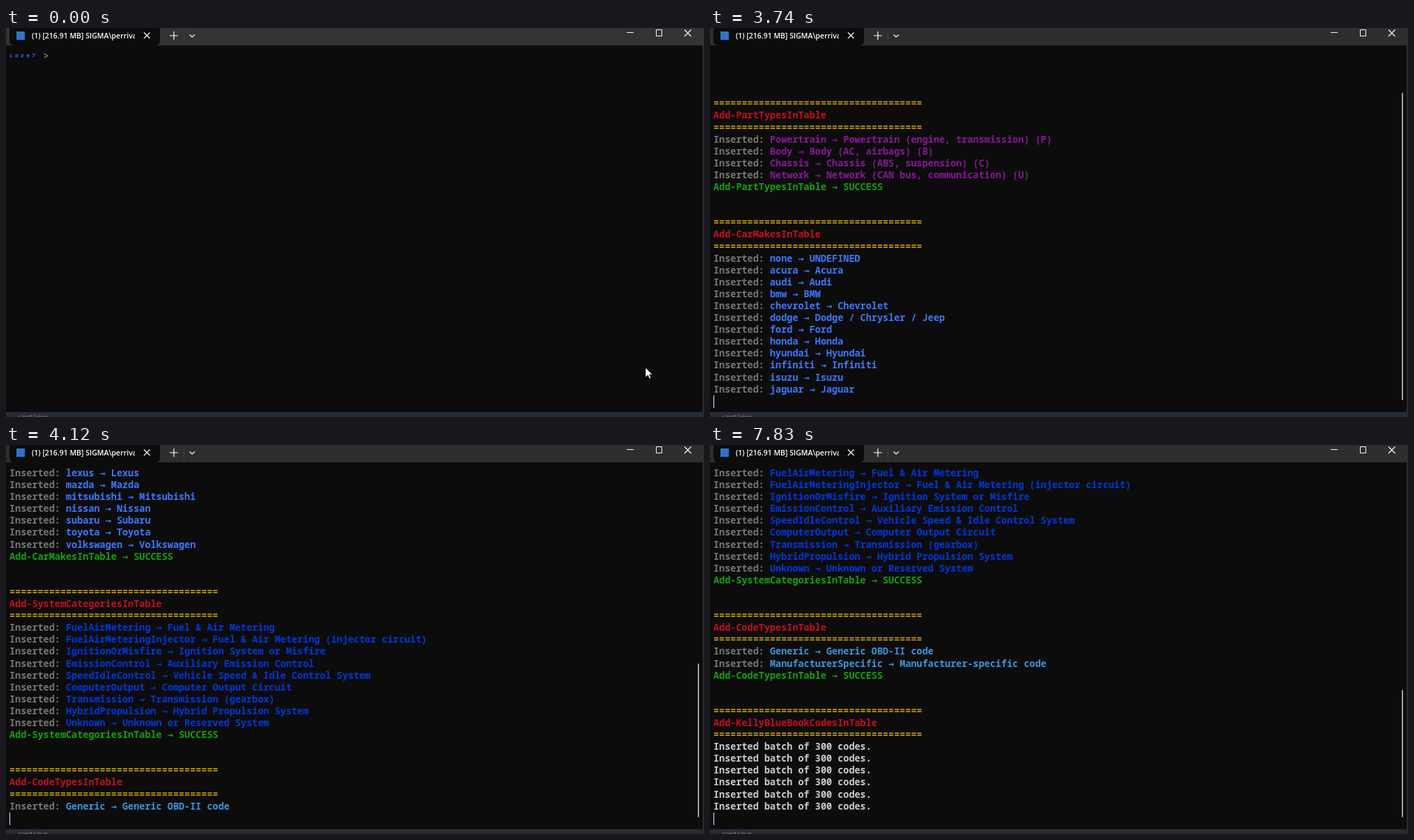
Animation of 1002 by 559 pixels, one loop 8000 ms. Source, as an HTML page:

```html
<!DOCTYPE html>
<html lang="en">
<head>
<meta charset="utf-8">
<title>Terminal</title>
<style>
html, body { margin: 0; width: 100%; height: 100%; overflow: hidden; background: #0c0c0c; }
#stage { position: relative; width: 1002px; height: 559px; overflow: hidden; background: #0c0c0c; }
#stage > * { position: absolute; }
#bar { left: 0; top: 0; width: 1002px; height: 25px; }
#tab { left: 5px; top: -6px; width: 216px; height: 31px; border-radius: 6px; background: #0c0c0c; }
#title { left: 37px; top: 2px; width: 148px; overflow: hidden; white-space: pre; color: #fff;
  font: 600 10.5px/19px "Open Sans", "Noto Sans", sans-serif; }
#icon { left: 15px; top: 5px; width: 12px; height: 12px; background: #3273c9; }
#edge { right: 0; top: 25px; width: 2px; height: 528px; background: #2b2b2b; }
#foot { left: 0; top: 552px; width: 1002px; height: 7px; overflow: hidden; background: #262c34;
  text-indent: 17px; font: 9px/13px "Noto Sans Mono", "DejaVu Sans Mono", monospace; }
#rows { left: 5px; top: 32px; color: #ccc; white-space: pre;
  font: 600 13.5px/17.1px "Noto Sans Mono", "DejaVu Sans Mono", monospace; font-variant-ligatures: none; }
#rows div { height: 17.1px; }
#rows i { font: 700 13.455px/10px "DejaVu Sans Mono", monospace; }
.core { display: inline-block; width: 40.5px; color: #3b78ff; font-size: 7.5px; font-weight: 700;
  letter-spacing: 3.6px; line-height: 10px; vertical-align: 3px; }
.fill { display: inline-block; width: 712.8px; height: 17.1px; vertical-align: top; background: #f9f1a5; color: #0c0c0c; }
#caret { width: 1px; height: 18px; background: #f2f2f2; }
#thumb { left: 993px; width: 2px; border-radius: 1px; background: #9f9f9f; }
svg { left: 0; top: 0; }
</style>
</head>
<body>
<div id="stage">
  <div id="bar"></div>
  <div id="tab"></div>
  <div id="icon"></div>
  <div id="title">(1) [216.91 MB] SIGMA\perrivau</div>
  <div id="edge"></div>
  <div id="foot">continue</div>
  <div id="rows"></div>
  <div id="caret"></div>
  <div id="thumb"></div>
  <svg width="1002" height="559" fill="none" stroke="#fff">
    <path stroke="#444" d="M255.5 1V22"/>
    <path stroke-width="1.2" d="M198 6.5l8.5 8.5m0-8.5l-8.5 8.5M235 11h12M241 5v12M263.5 9.5l3.7 3.5 3.7-3.5M974 2.5l9.5 9.5m0-9.5l-9.5 9.5"/>
    <path d="M891 6.5h10M933.5 2.5h8v9h-8z"/>
    <path id="mouse" fill="#fff" stroke="#000" stroke-width=".6" d="M0 0V14L3.4 10.8L5.6 16L7.8 15L5.6 10H9.8Z"/>
  </svg>
</div>
<script>
const LOOP = 8000, ROW = 17.1, CELL = 8.1, VIEW = 30;
const $ = id => document.getElementById(id);
const [bar, foot, rows, caret, thumb, mouse] = ["bar", "foot", "rows", "caret", "thumb", "mouse"].map($);
const ink = (color, text) =>
  `<span style="color:${color}">${text.replace(/&/g, "&amp;").replace("→", "<i>→</i>")}</span>`;

const lines = [];            // { t, html }, in order of time
let clock = 3260;
const print = html => lines.push({ t: clock, html });
const rule = ink("#c19c00", "=".repeat(37));

function heading(name) {
  for (const html of ["", "", rule, ink("#c50f1f", name), rule]) print(html);
}

function section(name, color, items) {
  heading(name);
  for (const item of items) {
    clock += 20;
    print(ink("#767676", "Inserted: ") + ink(color, item.replace("|", " → ")));
  }
  print(ink("#13a10e", name + " → SUCCESS"));
}

const capital = s => s[0].toUpperCase() + s.slice(1);
const special = { none: "UNDEFINED", bmw: "BMW", dodge: "Dodge / Chrysler / Jeep", landrover: "Land Rover" };
const makes = ("none acura audi bmw chevrolet dodge ford honda hyundai infiniti isuzu jaguar kia " +
  "landrover lexus mazda mitsubishi nissan subaru toyota volkswagen").split(" ");

print("");                   // the prompt line, filled in by prompt()
print("");
print("");
clock = 3420;
section("Add-PartTypesInTable", "#881798", [
  "Powertrain|Powertrain (engine, transmission) (P)",
  "Body|Body (AC, airbags) (B)",
  "Chassis|Chassis (ABS, suspension) (C)",
  "Network|Network (CAN bus, communication) (U)"]);
section("Add-CarMakesInTable", "#3b78ff", makes.map(m => m + "|" + (special[m] || capital(m))));
section("Add-SystemCategoriesInTable", "#0037da", [
  "FuelAirMetering|Fuel & Air Metering",
  "FuelAirMeteringInjector|Fuel & Air Metering (injector circuit)",
  "IgnitionOrMisfire|Ignition System or Misfire",
  "EmissionControl|Auxiliary Emission Control",
  "SpeedIdleControl|Vehicle Speed & Idle Control System",
  "ComputerOutput|Computer Output Circuit",
  "Transmission|Transmission (gearbox)",
  "HybridPropulsion|Hybrid Propulsion System",
  "Unknown|Unknown or Reserved System"]);
section("Add-CodeTypesInTable", "#3a96dd", [
  "Generic|Generic OBD-II code",
  "ManufacturerSpecific|Manufacturer-specific code"]);
clock = 4160;
heading("Add-KellyBlueBookCodesInTable");
for (clock of [6570, 6850, 7110, 7330, 7590, 7810]) print("Inserted batch of 300 codes.");

const progress = ink("#f9f1a5", "Reading web response stream [") +
  '<span class="fill">Downloaded: 0 Bytes of 0 Bytes</span>' + ink("#f9f1a5", "]");

function prompt(t) {
  const typed = t < 1930 ? "" : t < 2100 ? "." : t < 2260 ? ".\\" : t < 2500 ? ".\\d" : ".\\db.ps1";
  return '<span class="core">core7</span>' + ink(t < 1870 ? "#767676" : "#ccc", " > ") + ink("#f9f1a5", typed);
}

function caretOn(t) {
  if (t < 3260) return t >= 240 && t < 770 || t >= 1320 && t < 1870;
  return t < 4160 || t >= 4430 && Math.floor((t - 4430) / 533) % 2 === 0;
}

let shown = "";
function draw(t) {
  const done = lines.filter(l => l.t <= t).map(l => l.html);
  const row = done.length;                       // the row being written
  const total = Math.max(row + 1, t >= 5610 ? 70 : 0);
  const top = Math.max(0, total - VIEW);
  done[0] = prompt(t);
  if (t >= 5610 && t < 5830) done.push(progress);
  const html = done.slice(top).map(h => `<div>${h}</div>`).join("");
  if (html !== shown) rows.innerHTML = shown = html;

  caret.style.visibility = caretOn(t) ? "visible" : "hidden";
  caret.style.left = (row ? 5 : Math.round(5 + 8 * CELL)) + "px";
  caret.style.top = Math.round(32 + (row - top) * ROW) + "px";

  const size = total > VIEW ? 457 * VIEW / total : 0;
  thumb.style.top = 535 - size + "px";
  thumb.style.height = size + "px";

  bar.style.background = t < 240 ? "#333" : "#2e2e2e";
  foot.style.color = t < 240 ? "#94829f" : "#8f8886";
  const p = Math.min(1, Math.max(0, (t - 20) / 390)), e = p * p * (3 - 2 * p);
  mouse.setAttribute("transform", `translate(${918 - 138 * e} ${488 - 111 * e})`);
  mouse.style.visibility = t < 1930 ? "visible" : "hidden";
}

const start = performance.now();
function frame() {
  draw((performance.now() - start) % LOOP);
  requestAnimationFrame(frame);
}
frame();
</script>
</body>
</html>
```
